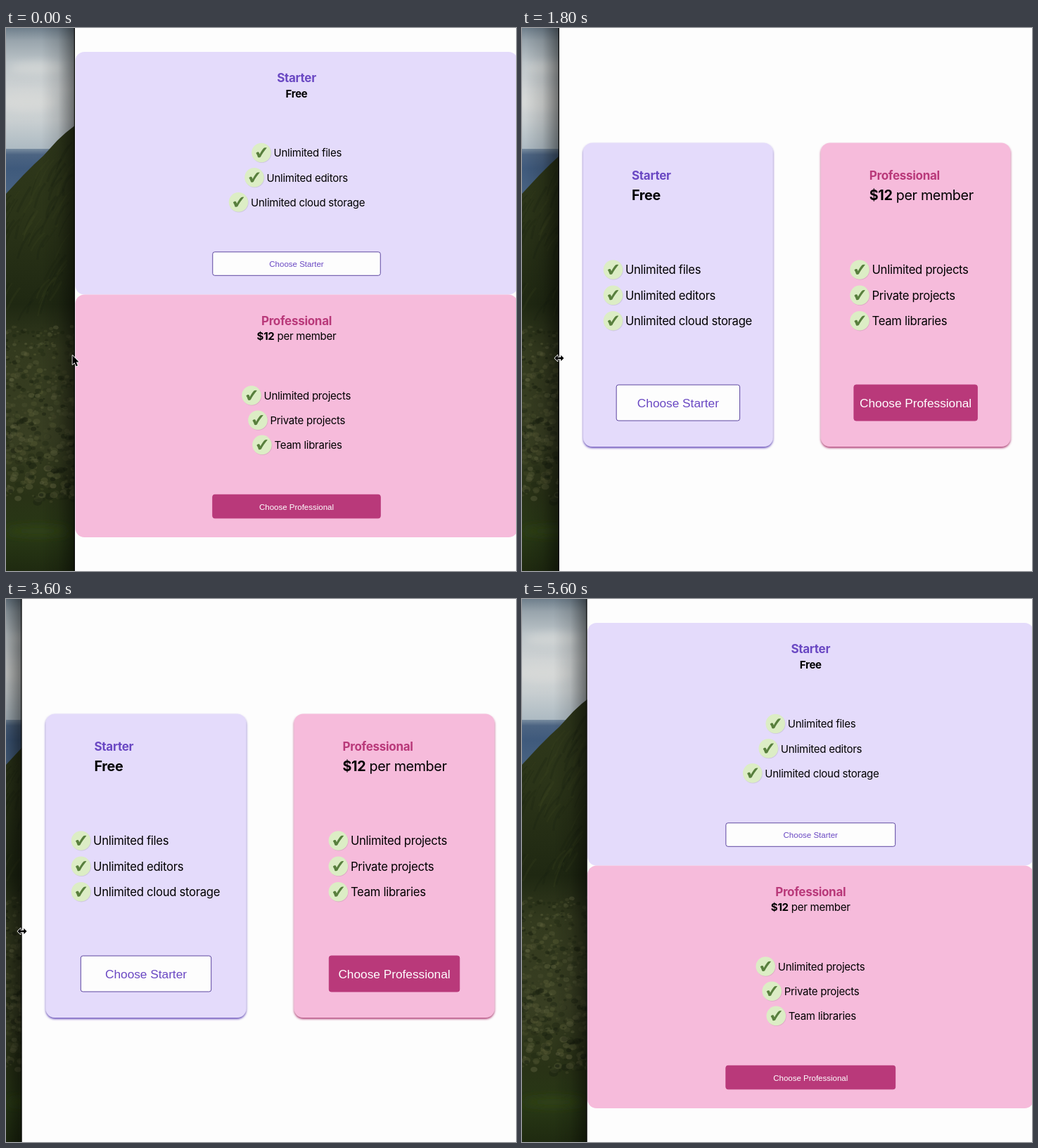
Write an HTML page that moves like this. It is 725 px wide and 773 px high and loops after 5800 ms.

```html
<!DOCTYPE html>
<html lang="en">
<head>
<meta charset="utf-8">
<title>Pricing cards</title>
<style>
html, body { margin: 0; width: 100%; height: 100%; overflow: hidden; background: #fdfdfd; }
svg { display: block; width: 100%; height: 100%; }
text { font-family: Inter, "Noto Sans", sans-serif; white-space: pre; }
text.button { font-family: "Liberation Sans", Arial, sans-serif; }
</style>
</head>
<body>
<svg viewBox="0 0 725 773">
  <defs>
    <linearGradient id="sky" x2="0" y2="1">
      <stop offset="0" stop-color="#6f7f8c"/>
      <stop offset=".1" stop-color="#98a4ac"/>
      <stop offset=".28" stop-color="#bcc4c8"/>
      <stop offset=".5" stop-color="#cfd3d4"/>
      <stop offset=".75" stop-color="#c9cfd1"/>
      <stop offset="1" stop-color="#aab8c1"/>
    </linearGradient>
    <linearGradient id="sea" x2="0" y2="1">
      <stop offset="0" stop-color="#788c9f"/>
      <stop offset=".12" stop-color="#4c6482"/>
      <stop offset=".4" stop-color="#3f5a7c"/>
      <stop offset="1" stop-color="#4a6483"/>
    </linearGradient>
    <linearGradient id="hill" gradientUnits="userSpaceOnUse" x1="0" y1="140" x2="0" y2="773">
      <stop offset="0" stop-color="#2f381b"/>
      <stop offset=".2" stop-color="#2b3418"/>
      <stop offset=".4" stop-color="#1f2812"/>
      <stop offset=".5" stop-color="#333a1e"/>
      <stop offset=".7" stop-color="#383e22"/>
      <stop offset=".83" stop-color="#293216"/>
      <stop offset=".92" stop-color="#283815"/>
      <stop offset="1" stop-color="#1f2a10"/>
    </linearGradient>
    <linearGradient id="shade">
      <stop offset="0" stop-color="#000" stop-opacity="0"/>
      <stop offset=".5" stop-color="#000" stop-opacity=".13"/>
      <stop offset="1" stop-color="#000" stop-opacity=".5"/>
    </linearGradient>
    <filter id="soft" x="-50%" y="-50%" width="200%" height="200%"><feGaussianBlur stdDeviation="6"/></filter>
    <filter id="lift0" x="-5%" y="-5%" width="110%" height="110%">
      <feDropShadow dx="0" dy="2" stdDeviation="1.6" flood-color="#5b3cb5" flood-opacity=".9"/>
    </filter>
    <filter id="lift1" x="-5%" y="-5%" width="110%" height="110%">
      <feDropShadow dx="0" dy="2" stdDeviation="1.6" flood-color="#a92d6b" flood-opacity=".9"/>
    </filter>
    <g id="tick">
      <circle cx=".6" cy=".8" r="13.8" opacity=".1"/>
      <circle r="13.8" fill="#dcedc5"/>
      <path d="M-7.6 .6C-6.4-1.4-3.6-1.6-3.1 .2L-2.4 2.2C-.4-1.8 2-5.2 4-6.9Q6-7.6 7.8-7.1C4-2.6 1 2-1.2 6.2Q-3 7.5-4.9 6.6Q-5.8 3.2-7.6 .6Z" fill="#587f3d"/>
    </g>
  </defs>
  <g id="photo"></g>
  <g id="page"></g>
  <g id="pointer"></g>
</svg>
<script>
const LOOP = 5800, STEP = 200, STACK_FROM = 70;

// time, window edge, pointer x, pointer y
const PATH = [
  [0, 98, 94.5, 473], [200, 98, 97, 471], [400, 95, 94, 470], [1000, 73, 70, 470],
  [1800, 53, 53, 470], [2600, 24, 24, 472], [2800, 21, 21, 472], [3400, 21, 21, 473],
  [3600, 22.5, 23, 473], [4400, 77, 86.5, 469], [4800, 92.5, 93, 469], [5800, 92.5, 93, 469]
];

const PLANS = [
  { name: 'Starter', ink: '#6a48c3', fill: '#e4dbfb', bold: 'Free', rest: '',
    items: ['Unlimited files', 'Unlimited editors', 'Unlimited cloud storage'],
    button: '#fdfdfd', label: '#6a48c3', stroke: '#5d46a0', wide: [-50, -60, -82.5], list: -92.4 },
  { name: 'Professional', ink: '#b9397a', fill: '#f6bbdb', bold: '$12', rest: ' per member',
    items: ['Unlimited projects', 'Private projects', 'Team libraries'],
    button: '#b9397a', label: '#fff', stroke: '#b9397a', wide: [-64, -55, -49], list: -79.6 }
];

const $ = id => document.getElementById(id);
const rect = (x, y, w, h, r, fill, more = '') =>
  `<rect x="${x}" y="${y}" width="${w}" height="${h}" rx="${r}" fill="${fill}" ${more}/>`;
const text = (x, y, size, content, more = '') =>
  `<text x="${x}" y="${y}" font-size="${size}" letter-spacing="${-size * .017}" ${more}>${content}</text>`;
const price = p => `<tspan font-weight="700">${p.bold}</tspan>${p.rest}`;
const tick = (x, y) => `<use href="#tick" x="${x}" y="${y}"/>`;

function button(p, cx, y, w, h, size, baseline) {
  return rect(cx - w / 2 + .5, y + .5, w - 1, h - 1, 3, p.button, `stroke="${p.stroke}"`) +
    `<text class="button" x="${cx}" y="${baseline}" font-size="${size}" fill="${p.label}" text-anchor="middle">Choose ${p.name}</text>`;
}

function stackedCard(p, i, edge) {
  const top = 34 + i * 345.5, left = edge + .5, cx = (edge + 728) / 2;
  const mid = 'text-anchor="middle"';
  return rect(left, top, 727.5 - left, 345.5, 13, p.fill) +
    text(cx, top + 43, 17, p.name, `${mid} font-weight="700" fill="${p.ink}"`) +
    text(cx, top + 64.7, 15, price(p), mid) +
    p.items.map((item, k) => {
      const x = cx + p.wide[k], y = top + 143.5 + k * 35.2;
      return tick(x, y) + text(x + 17.5, y + 5.8, 15, item);
    }).join('') +
    button(p, cx, top + 284.3, 239.5 + .42 * (98 - edge), 34.5, 11.5, top + 306);
}

function columnCard(p, i, edge) {
  const w = (592.5 - edge) / 2, left = edge + 34 + i * (w + 68), cx = left + w / 2;
  return rect(left, 163.5, w, 432.5, 13, p.fill, `filter="url(#lift${i})"`) +
    text(left + 69, 216, 17, p.name, `font-weight="700" fill="${p.ink}"`) +
    text(left + 69, 244.7, 19.7, price(p)) +
    p.items.map((item, k) => {
      const x = cx + p.list, y = 344 + k * 36.4;
      return tick(x, y) + text(x + 17.5, y + 6.2, 16.65, item);
    }).join('') +
    button(p, cx, 507.5, w * .654, 52, 17.25, 539.5);
}

function drawPhoto() {
  let seed = 7;
  const rnd = () => (seed = seed * 16807 % 2147483647) / 2147483647;
  const cloud = (x, y, rx, ry, c) => `<ellipse cx="${x}" cy="${y}" rx="${rx}" ry="${ry}" fill="${c}" filter="url(#soft)"/>`;
  let s = rect(0, 0, 100, 176, 0, 'url(#sky)') +
    cloud(45, 58, 40, 9, '#d0d4d4') + cloud(30, 105, 44, 14, '#d6d8d7') +
    rect(0, 172, 100, 70, 0, 'url(#sea)') +
    '<path d="M99 138L85 149L73 160L63 171L53 182L40 194L25 209L12 223L0 236V773H99Z" fill="url(#hill)"/>';
  for (let i = 0; i < 70; i++) {
    const x = rnd() * 98, y = 245 - x + rnd() * 200;
    s += `<path d="M${x} ${y}q${-8 - rnd() * 8} ${10 + rnd() * 8} ${-12 - rnd() * 10} ${26 + rnd() * 14}" fill="none" stroke="${rnd() < .5 ? '#3c4520' : '#182010'}" stroke-width="${1 + rnd() * 3}" opacity=".22"/>`;
  }
  for (let i = 0; i < 520; i++) {
    const y = 425 + rnd() * 250, near = (y - 425) / 250, r = 1 + rnd() * (2 + near * 2);
    const c = ['#171e0e', '#1e2712', '#4b502e', '#5b5f3c', '#555934'][Math.floor(rnd() * 5)];
    s += `<ellipse cx="${rnd() * 100}" cy="${y}" rx="${r * 1.3}" ry="${r}" fill="${c}" opacity="${.2 + rnd() * .35}"/>`;
  }
  s += cloud(45, 716, 45, 8, '#2d3f18');
  $('photo').innerHTML = s;
}

function pointer(x, y, arrow) {
  const d = arrow
    ? 'M0-7V6L3 3.3L5.2 8.4L7.4 7.4L5.3 2.5H9Z'
    : 'M-6.5 0L-2.3-4.3V-1.2H2.3V-4.3L6.5 0L2.3 4.3V1.2H-2.3V4.3Z';
  return `<path transform="translate(${x} ${y})" d="${d}" fill="#000" stroke="#fff" stroke-width="1.6" paint-order="stroke" stroke-linejoin="round"/>`;
}

function sample(t) {
  const n = Math.max(1, PATH.findIndex(k => k[0] >= t));
  const a = PATH[n - 1], b = PATH[n], u = (t - a[0]) / (b[0] - a[0]);
  return [1, 2, 3].map(i => a[i] + (b[i] - a[i]) * u);
}

function draw(t) {
  const [edge, px, py] = sample(t);
  const card = edge > STACK_FROM ? stackedCard : columnCard;
  $('page').innerHTML = rect(edge - 48, 0, 48, 773, 0, 'url(#shade)') +
    rect(edge, 0, 725 - edge, 773, 0, '#fdfdfd') +
    rect(edge - 1.2, 0, 1.2, 773, 0, '#0c0c0c') +
    PLANS.map((p, i) => card(p, i, edge)).join('');
  $('pointer').innerHTML = t < 4800 ? pointer(px, py, t < STEP) : '';
}

let shown = -1;
const start = performance.now();
function tickFrame() {
  const t = Math.floor((performance.now() - start) % LOOP / STEP) * STEP;
  if (t !== shown) draw(shown = t);
  requestAnimationFrame(tickFrame);
}
drawPhoto();
tickFrame();
</script>
</body>
</html>
```
